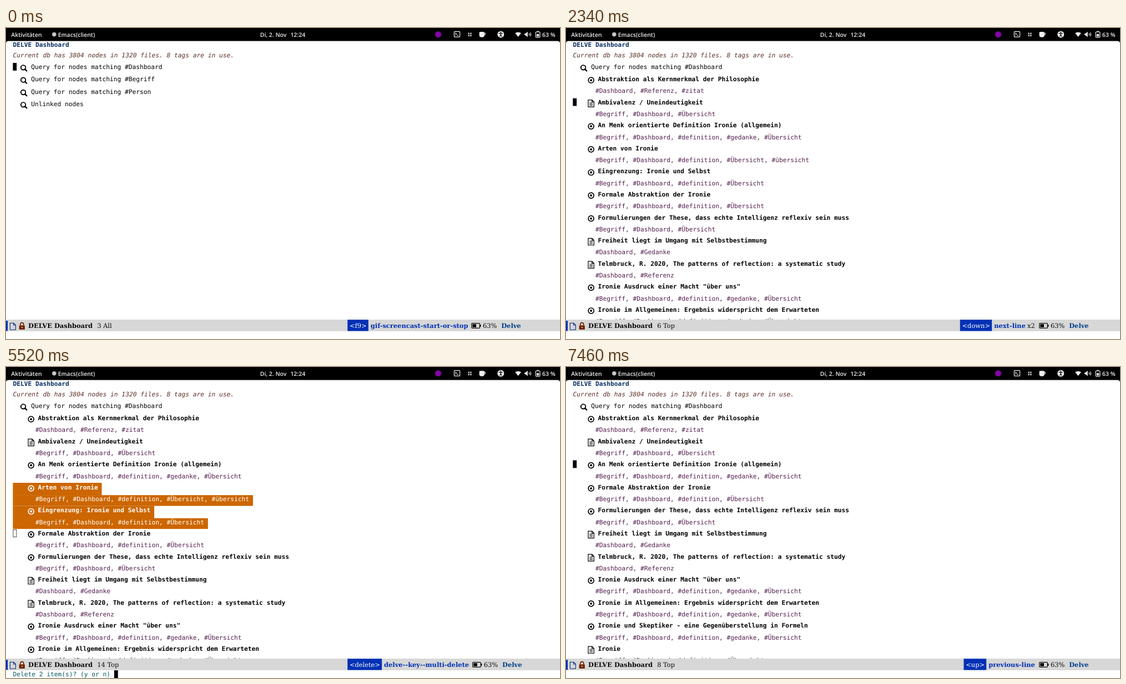
Write an HTML page that moves like this. It is 998 px wide and 561 px high and loops after 8000 ms.

```html
<!DOCTYPE html>
<html lang="de">
<head>
<meta charset="utf-8">
<title>Delve Dashboard</title>
<style>
html, body { margin: 0; width: 100%; height: 100%; overflow: hidden; background: #fff; }
svg { display: block; width: 998px; height: 561px; }
text { white-space: pre; text-rendering: geometricPrecision; }
.mono { font: 11.224px "DejaVu Sans Mono", monospace; }
.serif { font: 11.44px "DejaVu Serif", serif; fill: #0a0a0a; }
.bar { font: 600 10.45px "Open Sans", "Noto Sans", sans-serif; fill: #f0f0f0; }
.b { font-weight: 700; }
.head { font-weight: 700; fill: #093060; }
.info { font-style: italic; fill: #5d3026; }
.tags { fill: #541f4f; }
.prompt { fill: #005a5f; }
.cmd { font-weight: 700; fill: #0030b4; }
.mode { font-weight: 700; fill: #003f8a; }
.key { fill: #fff; }
.marked { fill: #fff; color: #fff; }
.scene { display: none; }
.scene.on { display: inline; }
</style>
</head>
<body>
<svg viewBox="0 0 998 561">
  <defs>
    <g id="search" fill="none" stroke="currentColor">
      <circle cx="-.9" cy="-.9" r="4.2" stroke-width="1.9"/>
      <path d="M2.2 2.2 5.2 5.2" stroke-width="2.4" stroke-linecap="round"/>
    </g>
    <g id="node">
      <circle r="5" fill="none" stroke="currentColor" stroke-width="1.7"/>
      <circle r="2" fill="currentColor"/>
    </g>
    <g id="file" fill="none" stroke="currentColor" stroke-width="1.2">
      <path d="M-5.2-6.2H1.8L5.2-2.8V6.2H-5.2ZM1.6-6V-2.6H5"/>
      <path d="M-2.9-1H2.9M-2.9 1.3H2.9M-2.9 3.6H2.9" stroke-width="1"/>
    </g>
    <g id="battery">
      <rect x=".6" y="-4.4" width="14.6" height="8.8" rx="1.2" fill="none" stroke="#0a0a0a" stroke-width="1.2"/>
      <rect x="2.2" y="-2.8" width="6.6" height="5.6"/>
      <rect x="15.6" y="-2" width="1.6" height="4"/>
    </g>
  </defs>
  <rect width="998" height="561" fill="#fff"/>
  <g id="scenes"></g>

  <path d="M0 0H998V28Q998 23.4 993.4 23.4H4.6Q0 23.4 0 28Z"/>
  <g class="bar">
    <text x="9.3" y="15.6">Aktivitäten</text>
    <text x="93.8" y="15.6">Emacs(client)</text>
    <text x="457.8" y="15.6">Di, 2. Nov</text>
    <text x="512.4" y="15.6">12:24</text>
    <text x="966" y="15.6">63 %</text>
  </g>
  <circle cx="86.8" cy="11.6" r="3.8" fill="#c4c4c4"/>
  <circle cx="778.6" cy="11.5" r="5.5" fill="#8505a8"/>
  <g fill="none" stroke="#eee" stroke-width="1.2">
    <rect x="807.4" y="6.4" width="10.2" height="9.8" rx="1"/>
    <path d="M809.4 9 811.4 10.8 809.4 12.6M812.4 13.2H815"/>
    <path d="M861.3 9.2Q864.2 9 863.3 11.4 862.5 13 860.3 12.8"/>
    <path d="M942.2 9.6Q943.6 11.5 942.2 13.4M944.2 8Q946.8 11.5 944.2 15"/>
    <rect x="954.3" y="7" width="7.6" height="9.8" rx="1"/>
  </g>
  <g fill="#eee">
    <path d="M832.2 8.6H835V11.3H832.2ZM836 8.6H838.8V11.3H836ZM832.2 12.2H835V14.9H832.2ZM836 12.2H838.8V14.9H836Z" opacity=".75"/>
    <path d="M852.6 9.2H861.8V13.6Q861.4 16.8 857.2 16.8 853 16.8 852.6 13.6Z"/>
    <ellipse cx="857.2" cy="8.6" rx="4.8" ry="1.8"/>
    <circle cx="891.3" cy="11.5" r="6"/>
    <path d="M917.2 9.3Q922.6 5.6 928 9.3L922.6 16Z"/>
    <path d="M934.2 9.7H936.4L939.8 6.6V16.4L936.4 13.3H934.2Z"/>
    <path d="M956.4 5.4H959.8V7H956.4ZM956 11H960.2V15.2H956Z"/>
  </g>
  <g fill="none" stroke="#000" stroke-width="1.1">
    <path d="M887.6 9.9H895M891.3 9.9V12.4L889.3 15.6M891.3 12.4 893.3 15.6"/>
    <circle cx="891.3" cy="7.9" r=".5"/>
  </g>
</svg>
<script>
const LOOP = 8000, CHAR = 6.757, PITCH = 41.58;

const tagNames = {
  B: 'Begriff', D: 'Dashboard', d: 'definition', g: 'gedanke', G: 'Gedanke',
  U: 'Übersicht', u: 'übersicht', R: 'Referenz', z: 'zitat'
};

const nodes = [
  ['node', 'Abstraktion als Kernmerkmal der Philosophie', 'DRz'],
  ['file', 'Ambivalenz / Uneindeutigkeit', 'BDU'],
  ['node', 'An Menk orientierte Definition Ironie (allgemein)', 'BDdgU'],
  ['node', 'Arten von Ironie', 'BDdUu'],
  ['node', 'Eingrenzung: Ironie und Selbst', 'BDdU'],
  ['node', 'Formale Abstraktion der Ironie', 'BDdU'],
  ['node', 'Formulierungen der These, dass echte Intelligenz reflexiv sein muss', 'BDU'],
  ['file', 'Freiheit liegt im Umgang mit Selbstbestimmung', 'DG'],
  ['file', 'Telmbruck, R. 2020, The patterns of reflection: a systematic study', 'DR'],
  ['node', 'Ironie Ausdruck einer Macht "über uns"', 'BDdgU'],
  ['node', 'Ironie im Allgemeinen: Ergebnis widerspricht dem Erwarteten', 'BDdgU'],
  ['node', 'Ironie und Skeptiker - eine Gegenüberstellung in Formeln', 'BDdgU'],
  ['file', 'Ironie', 'BDdU']
];
const shorter = nodes.filter((n, i) => i !== 3 && i !== 4);
const marks = [3, 4];

// key: [label, box left, box right]; bat: left edge of the battery
const down = { key: ['<down>', 709.8, 767.2], cmd: 'next-line', bat: 852.2 };
const scenes = [
  { at: 0, line: 3, pos: 'All', key: ['<f9>', 615.2, 652.8], cmd: 'gif-screencast-start-or-stop', bat: 838.2 },
  { at: 1000, line: 4, list: nodes, ...down, key: ['<down>', 730, 787.4], bat: 855 },
  { at: 2340, line: 6, list: nodes, ...down, count: 2 },
  { at: 2910, line: 10, list: nodes, ...down, count: 4 },
  { at: 3180, line: 16, list: nodes, ...down, count: 7 },
  { at: 3580, line: 10, list: nodes, key: ['<up>', 696.3, 737.1], cmd: 'previous-line', count: 3, bat: 848.9 },
  { at: 4480, line: 14, list: nodes, marks, key: ['m', 683, 708.2], cmd: 'lister-mode-mark', count: 2, bat: 847.8 },
  { at: 5520, line: 14, list: nodes, marks, ask: true, key: ['<delete>', 615.2, 677.1], cmd: 'delve--key--multi-delete', bat: 840 },
  { at: 6400, line: 10, list: shorter, answer: true, key: ['y', 696.3, 717.1], cmd: 'y-or-n-p-insert-y', bat: 833.2 },
  { at: 7460, line: 8, list: shorter, key: ['<up>', 716.5, 757.2], cmd: 'previous-line', bat: 852.2 }
];

const esc = s => s.replace(/&/g, '&amp;').replace(/</g, '&lt;');
const text = (x, y, s, cls) => `<text x="${x}" y="${y}" class="${cls}">${esc(s)}</text>`;
const rect = (x, y, w, h, fill, more = '') =>
  `<rect x="${x}" y="${y}" width="${w}" height="${h}" fill="${fill}" ${more}/>`;
const icon = (id, x, y) => `<use href="#${id}" x="${x}" y="${y}"/>`;
const query = (i, label) =>
  icon('search', 32, 72.2 + i * 22.35) + text(45.2, 73.9 + i * 22.35, label, 'mono');

function entry([kind, title, letters], i, marked) {
  const dy = i * PITCH;
  const tags = [...letters].map(c => '#' + tagNames[c]).join(', ');
  const width = (x, s) => x + (s.length + 1) * CHAR - 12.4;
  const back = marked
    ? rect(12.4, 84.2 + dy, width(57.6, title), 22.6, '#cc6600') +
      rect(12.4, 106.4 + dy, width(53, tags), 19.4, '#cc6600')
    : '';
  return back + `<g class="${marked ? 'marked' : ''}">` +
    icon(kind, 45.2, (kind === 'file' ? 94.5 : 94.2) + dy) +
    text(57.6, 96.1 + dy, title, 'mono b') +
    text(53, 117.4 + dy, tags, marked ? 'mono' : 'mono tags') + '</g>';
}

function cursor({ line, ask }) {
  const y = line === 3 ? 63 : 85.2 + (line - 4) / 2 * PITCH;
  return ask
    ? rect(12.9, y + .4, 6, 13.2, 'none', 'stroke="#222" stroke-width=".8"')
    : rect(12.4, y, 6.8, 13.8, '#000');
}

function modeLine({ line, pos = 'Top', key: [label, left, right], cmd, count, bat }) {
  return rect(0, 526, 998, 21, '#d7d7d7') + rect(0, 528.2, 3.1, 18.2, '#0030b4') +
    '<path d="M7.4 532.2H13.8L17.4 535.8V544.2H7.4ZM13.6 532.4V536H17.2" fill="none" stroke="#0a2a80" stroke-width="1.1"/>' +
    '<path d="M25.9 537V534.6A2.9 2.9 0 0 1 31.7 534.6V537" fill="none" stroke="#702800" stroke-width="1.7"/>' +
    rect(23.6, 536.4, 10.4, 7.6, '#702800', 'rx="1"') +
    '<circle cx="28.8" cy="540" r="1.1" fill="#d7d7d7"/>' +
    text(40, 541.3, 'DELVE Dashboard', 'serif b') +
    text(164.2, 541.3, `${line} ${pos}`, 'serif') +
    rect(left, 526.2, right - left, 20.4, '#0030b4') +
    text(left + 3.7, 541.3, label, 'serif key') +
    text(right + 4, 541.3, cmd, 'serif cmd') +
    (count ? text(bat - 21.2, 541.3, 'x' + count, 'serif') : '') +
    icon('battery', bat, 537) +
    text(bat + 20.8, 541.3, '63%', 'serif') +
    text(bat + 54, 541.3, 'Delve', 'serif mode');
}

function echoArea({ ask, answer }) {
  const question = 'Delete 2 item(s)? (y or n) ';
  if (ask) return text(12.5, 557.8, question, 'mono prompt') + rect(194.9, 547.2, 6.8, 13.8, '#000');
  return answer ? text(12.5, 557.8, question + 'y', 'mono') : '';
}

function build(s) {
  const body = s.list
    ? query(0, 'Query for nodes matching #Dashboard') +
      s.list.slice(0, 11).map((n, i) => entry(n, i, s.marks?.includes(i))).join('')
    : ['#Dashboard', '#Begriff', '#Person'].map((t, i) => query(i, 'Query for nodes matching ' + t)).join('') +
      query(3, 'Unlinked nodes');
  return '<g class="scene">' +
    text(12.5, 34.2, 'DELVE Dashboard', 'mono head') +
    text(12.5, 53.4, 'Current db has 3804 nodes in 1320 files. 8 tags are in use.', 'mono info') +
    body + cursor(s) + modeLine(s) + rect(0, 547, 998, 14, '#fff') + echoArea(s) + '</g>';
}

const stage = document.getElementById('scenes');
stage.innerHTML = scenes.map(build).join('');
const groups = [...stage.children];
const start = performance.now();

function draw(now) {
  const t = Math.max(0, now - start) % LOOP;
  const current = scenes.findLastIndex(s => s.at <= t);
  groups.forEach((g, i) => g.classList.toggle('on', i === current));
  requestAnimationFrame(draw);
}
draw(start);
</script>
</body>
</html>
```
